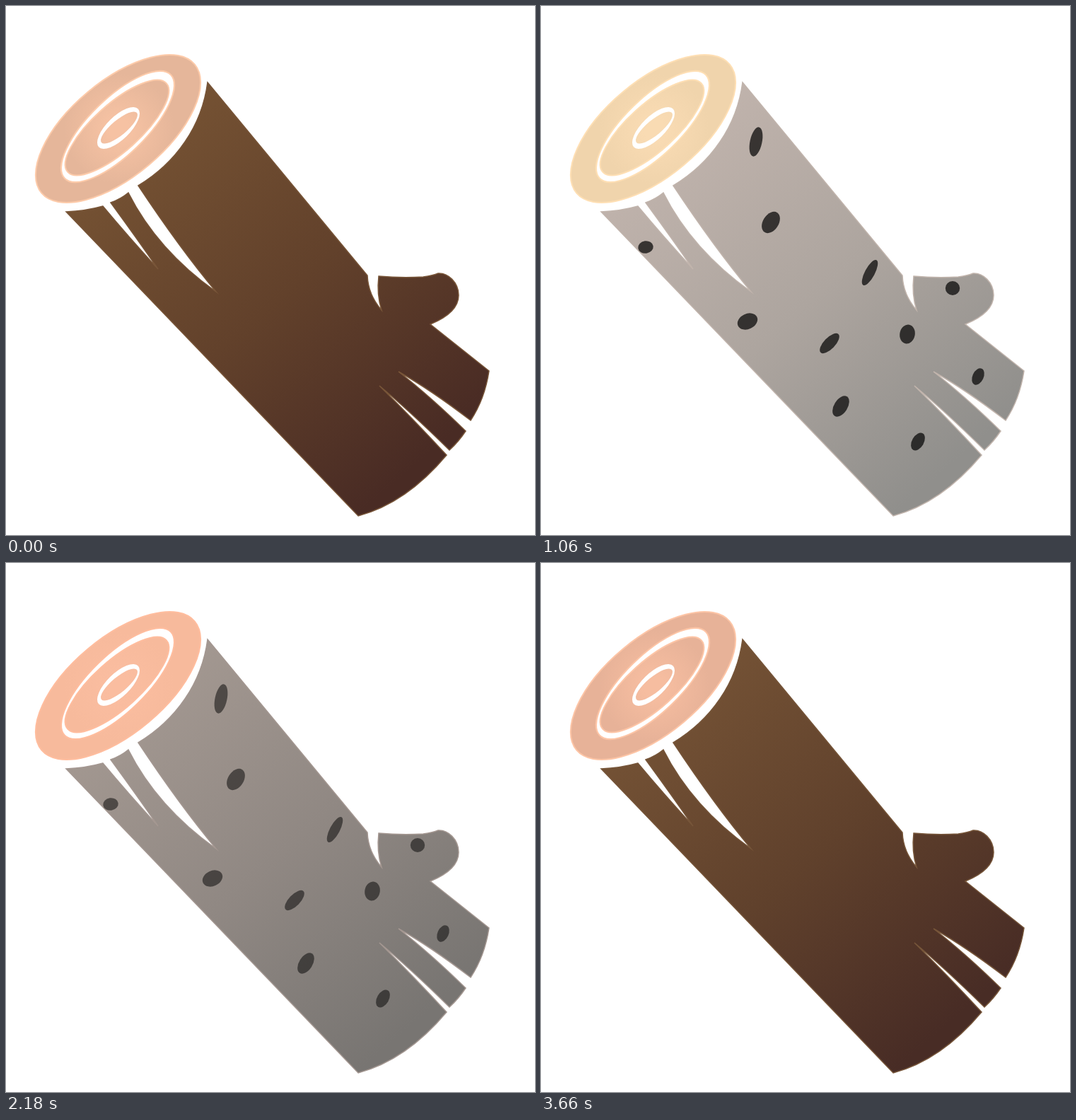
Recreate the animation shown at these times as an HTML page with a canvas. Size 748 by 748 pixels, loop 3720 ms.

```html
<!DOCTYPE html>
<html lang="en">
<head>
<meta charset="utf-8">
<title>Log</title>
<style>
  html, body { margin: 0; width: 100%; height: 100%; overflow: hidden; background: #fff; }
  canvas { display: block; width: 748px; height: 748px; }
</style>
</head>
<body>
<canvas id="stage" width="748" height="748"></canvas>
<script>
const ctx = document.getElementById('stage').getContext('2d');
const HOLD = 700, STEP = 60, PHASE = 1240;

// Bark runs along the trunk; wood runs outwards from the middle of the cut.
const woods = [
  { bark: [[117, 82, 51], [98, 65, 43], [73, 43, 36]], barkEdge: [120, 85, 56],
    wood: [[246, 194, 163], [229, 182, 154]], woodEdge: [253, 203, 170], spots: 0 },
  { bark: [[224, 221, 224], [205, 208, 209], [174, 186, 185]], barkEdge: [224, 220, 222],
    wood: [[250, 230, 186], [244, 225, 180]], woodEdge: [255, 231, 184], spots: 1 },
  { bark: [[102, 82, 66], [82, 64, 52], [66, 48, 42]], barkEdge: [103, 82, 68],
    wood: [[250, 147, 133], [250, 146, 132]], woodEdge: [255, 147, 131], spots: 0 }
];

const trunk = new Path2D(`M285 108 L511 381
  Q512 408 531 430 Q524 408 527 382
  Q560 385 590 383 Q604 381 611 378 C625 377 640 391 640 409 C640 428 622 441 600 450
  L683 516 Q677 556 657 586
  Q601 543 555 517 Q600 552 650 601 Q640 616 627 628
  Q570 572 528 537 Q572 580 623 635 Q566 703 498 721
  L85 291 Q112 290 137 283
  Q172 325 215 372 Q186 330 148 278 Q162 273 173 264
  Q214 345 297 404 Q246 343 187 254
  C240 222 277 170 285 108 Z`);

// x, y, radius x, radius y, rotation in degrees
const spots = [
  [304, 192, 8.5, 21, 12], [325, 306, 11, 16.5, 33], [148, 341, 10.8, 8.8, -8],
  [465, 377, 7, 20, 28], [292, 446, 14.8, 10.8, -25], [408, 477, 8, 18, 44],
  [518, 464, 10.7, 13.5, 12], [582, 399, 10.2, 10, 0], [618, 524, 7.8, 12.3, 25],
  [424, 566, 9.5, 16.3, 32], [533, 616, 8.3, 13.5, 30]
];

const lerp = (a, b, k) => a + (b - a) * k;
const mix = (a, b, k) => `rgb(${a.map((v, i) => lerp(v, b[i], k)).join(',')})`;

function blend(gradient, from, to, k) {
  from.forEach((color, i) => gradient.addColorStop(i / (from.length - 1), mix(color, to[i], k)));
  return gradient;
}

function oval(x, y, rx, ry, degrees, fill, edge) {
  ctx.beginPath();
  ctx.ellipse(x, y, rx, ry, degrees * Math.PI / 180, 0, Math.PI * 2);
  ctx.fillStyle = fill;
  ctx.fill();
  if (edge) {
    ctx.strokeStyle = edge;
    ctx.stroke();
  }
}

function draw(a, b, k) {
  ctx.fillStyle = '#fff';
  ctx.fillRect(0, 0, 748, 748);
  ctx.lineWidth = 2;

  ctx.fillStyle = blend(ctx.createLinearGradient(190, 180, 590, 640), a.bark, b.bark, k);
  ctx.fill(trunk);
  ctx.strokeStyle = mix(a.barkEdge, b.barkEdge, k);
  ctx.lineWidth = 1.5;
  ctx.stroke(trunk);

  ctx.globalAlpha = lerp(a.spots, b.spots, k);
  spots.forEach(spot => oval(...spot, '#000'));
  ctx.globalAlpha = 1;

  ctx.lineWidth = 2;
  const wood = blend(ctx.createRadialGradient(160, 174, 15, 160, 174, 78), a.wood, b.wood, k);
  const edge = mix(a.woodEdge, b.woodEdge, k);
  oval(158.5, 173.5, 141.4, 67.2, -40, wood, edge);
  oval(158, 170.5, 104.8, 39.7, -44.3, '#fff', edge);
  oval(157, 172, 93.8, 33.1, -41.9, wood, edge);
  oval(159, 172.5, 38.8, 16.3, -44.3, '#fff');
  oval(160, 172, 32.7, 10.7, -39.9, wood);
}

function frame() {
  const time = performance.now() % (PHASE * woods.length);
  const index = Math.floor(time / PHASE);
  const local = time % PHASE;
  const k = local < HOLD ? 0 : (Math.floor((local - HOLD) / STEP) + 1) / 10;
  draw(woods[index], woods[(index + 1) % woods.length], k);
  requestAnimationFrame(frame);
}
frame();
</script>
</body>
</html>
```
